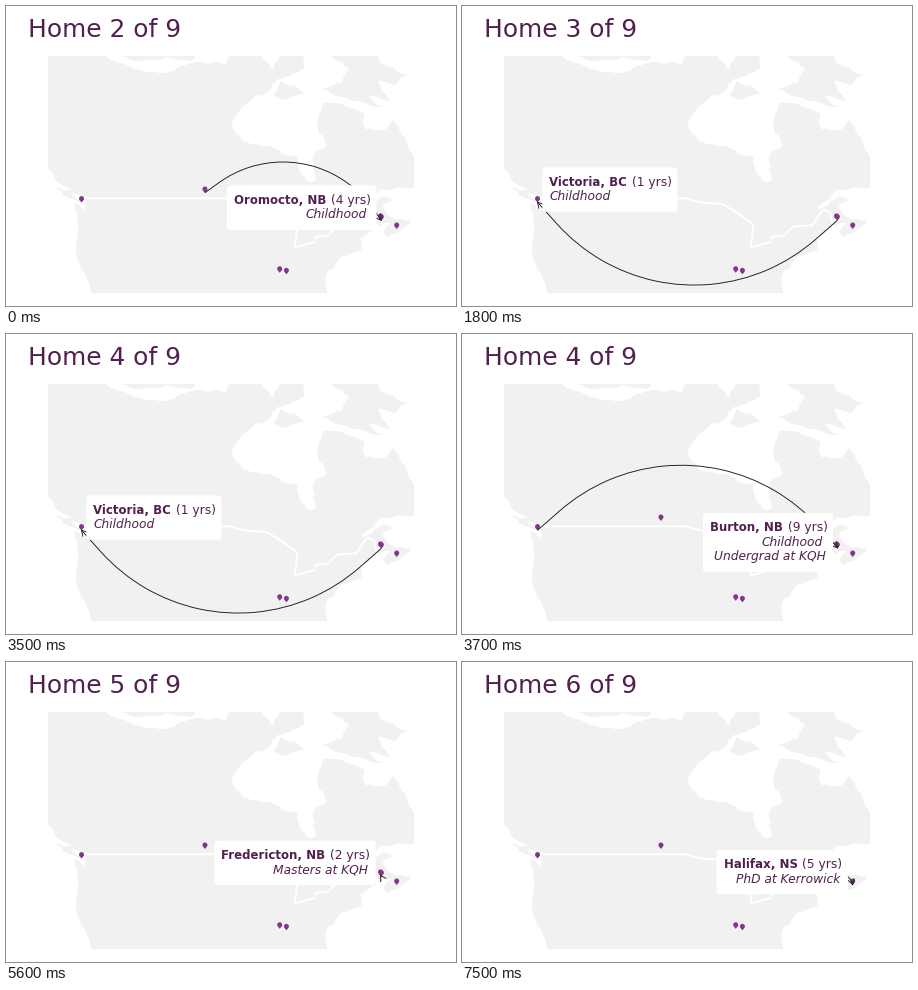
Write a matplotlib script that moves like this. It is 450 px wide and 300 px high and loops after 8 s.

```python
import math
import random

import matplotlib.pyplot as plt
from matplotlib.animation import FuncAnimation
from matplotlib.patches import (Circle, FancyBboxPatch, PathPatch, Polygon,
                                Rectangle)
from matplotlib.path import Path

W, H, DPI = 450, 300, 100
STEP, LOOP = 100, 8000
STAY, LEAD = 1900, 200          # time per move, title runs ahead by LEAD
PT = 72 / DPI
LAND, INK, PIN, LINE = "#f1f1f1", "#51204f", "#86338a", "#222222"

plt.rcParams["font.family"] = "DejaVu Sans"
random.seed(11)

# Key points as (longitude, latitude); the edges between are roughened
COAST = [
    # Arctic
    (-133, 71), (-125, 70), (-121, 69.6), (-114.5, 68), (-108, 66.9),
    (-104, 68), (-96, 68.1), (-94, 71), (-91, 70), (-87, 67.3), (-85.4, 71),
    (-81.6, 71), (-81.3, 67.5), (-86.2, 66), (-87.5, 64.5), (-90.6, 63.5),
    # Hudson Bay and Labrador
    (-94.7, 60), (-94.5, 58.7), (-92.4, 57), (-85, 55.3), (-82.3, 55),
    (-82, 52.9), (-80, 51.2), (-78.9, 51.6), (-79.6, 54.7), (-76.7, 56.5),
    (-78.5, 58.8), (-77.5, 62.5), (-73.7, 62.4), (-69.7, 61), (-69.5, 58.9),
    (-66, 58.8), (-64.5, 60.3), (-58, 53),
    # Gulf of St Lawrence and Atlantic
    (-58, 50.3), (-66.9, 50.1), (-71.2, 46.8), (-66, 49.2), (-64.4, 48.7),
    (-66.3, 48), (-64.6, 46.2), (-61.4, 45.8), (-60.3, 46.8), (-61.2, 45.2),
    (-65.6, 43.5), (-66, 44.4), (-64.6, 45.6), (-67, 45), (-70.5, 43.3),
    (-70.2, 41.8), (-74, 40.7), (-75.5, 39), (-76.8, 38.4), (-76.4, 34),
    # Pacific
    (-120.6, 34), (-122.5, 37.7), (-124.2, 40.4), (-124, 46.3),
    (-124.7, 48.2), (-122.5, 47.4), (-122.8, 49.2), (-127.5, 51.1),
    (-130, 54.2), (-133, 55),
]
ISLANDS = [
    [(-128.3, 50.6), (-125.3, 50.1), (-123.4, 48.4), (-126, 49.1)],
    [(-117, 70), (-113, 68.6), (-102, 68.9), (-101, 70)],
    [(-87, 63.7), (-85.6, 65.7), (-81, 64), (-85, 63.1)],
    [(-78, 71), (-72.6, 67.4), (-74, 65.5), (-77.8, 64.8), (-71, 62.9),
     (-66, 62), (-68.8, 63.7), (-65, 62.9), (-67.5, 66.2), (-64, 65.2),
     (-61.5, 66.7), (-67, 68.5), (-68, 71)],
]
BORDER = [
    (-123.1, 49), (-95.2, 49), (-92.5, 48.4), (-88.3, 48.2), (-84.8, 46.6),
    (-82.4, 45.2), (-82.9, 42), (-79, 42.8), (-79, 43.5), (-76.8, 43.6),
    (-74.7, 45), (-71.3, 45.1), (-69.2, 47.4), (-67.9, 47), (-67.3, 45),
]

VICTORIA, BRANDON = (-123.37, 48.43), (-99.95, 49.8)
OROMOCTO, BURTON = (-66.48, 45.85), (-66.4, 45.92)
FREDERICTON, HALIFAX = (-66.64, 45.96), (-63.57, 44.65)
SOUTH = [(-85.77, 38.4), (-84.5, 38.18)]


def project(place):
    return 725.7 + 5.27 * place[0], 535.3 - 7 * place[1]


def jag(p, q):
    """Midpoint displacement from p to q, leaving q out."""
    size = math.dist(p, q)
    if size < 3:
        return [p]
    shift = min(0.13 * size, 2.5) * random.uniform(-1, 1) / size
    mid = ((p[0] + q[0]) / 2 + shift * (p[1] - q[1]),
           (p[1] + q[1]) / 2 + shift * (q[0] - p[0]))
    return jag(p, mid) + jag(mid, q)


def rough(places):
    pts = [project(p) for p in places]
    return [c for p, q in zip(pts, pts[1:] + pts[:1]) for c in jag(p, q)]


fig = plt.figure(figsize=(W / DPI, H / DPI), dpi=DPI, facecolor="white")
ax = fig.add_axes([0, 0, 1, 1])
ax.set(xlim=(0, W), ylim=(H, 0))
ax.axis("off")


def stroke(points, color, width, z):
    return ax.plot(*zip(*points), color=color, lw=width * PT, zorder=z)[0]


def write(x, y, text, size=12.2, **style):
    return ax.text(x, y, text, fontsize=size * PT, color=INK, va="baseline",
                   zorder=7, **style)


def width(text):
    return text.get_window_extent().width


def draw_map():
    window = Rectangle((42, 49.5), 366, 237.5, transform=ax.transData)
    for shape in [COAST] + ISLANDS:
        land = Polygon(rough(shape), fc=LAND, ec="none", zorder=1)
        ax.add_patch(land)
        land.set_clip_path(window)
    stroke([project(p) for p in BORDER], "white", 2, 2)


def draw_pin(place):
    x, y = project(place)
    y -= 3.7
    ax.add_patch(Circle((x, y), 2.5, fc=PIN, ec="none", zorder=4))
    ax.add_patch(Polygon([(x - 2, y + 1.3), (x + 2, y + 1.3), (x, y + 4)],
                         fc=PIN, ec="none", zorder=4))


def arrow(start, end, bow=0.2525, parts=6, head=6):
    """Spline over points of a circular arc, with an open head."""
    (x0, y0), (x1, y1) = project(start), project(end)
    tilt = math.atan2(y1 - y0, x1 - x0)
    half = 2 * math.atan(2 * bow)
    r = math.hypot(x1 - x0, y1 - y0) / 2 / math.sin(half)
    cx = (x0 + x1) / 2 - r * math.cos(half) * math.sin(tilt)
    cy = (y0 + y1) / 2 + r * math.cos(half) * math.cos(tilt)
    pts = []
    for i in range(parts + 1):
        a = tilt - math.pi / 2 + half * (2 * i / parts - 1)
        pts.append((cx + r * math.cos(a), cy + r * math.sin(a)))

    mids = [((p[0] + q[0]) / 2, (p[1] + q[1]) / 2)
            for p, q in zip(pts, pts[1:])]
    verts = [pts[0], mids[0]]
    for p, m in zip(pts[1:-1], mids[1:]):
        verts += [p, m]
    verts.append(pts[-1])
    codes = ([Path.MOVETO, Path.LINETO]
             + [Path.CURVE3] * (2 * parts - 2) + [Path.LINETO])
    curve = PathPatch(Path(verts, codes), fc="none", ec=LINE, lw=0.95 * PT,
                      zorder=5)
    ax.add_patch(curve)

    a = tilt + half * (1 - 1 / parts)
    barbs = [(x1 - head * math.cos(a + s), y1 - head * math.sin(a + s))
             for s in (-math.pi / 6, math.pi / 6)]
    return [curve, stroke([barbs[0], (x1, y1), barbs[1]], LINE, 0.95, 5)]


def label(place, name, years, *notes, side="left"):
    """Card beside a place, as wide as its heading."""
    x, y = project(place)
    top = y - 35
    base = top + 18.4
    bold = write(0, base, name, size=11.8, weight="bold")
    plain = write(0, base, f"({years} yrs)", ha="right")
    wide = width(bold) + width(plain) + 17.2
    x0 = x + 4.8 if side == "right" else x - 4.8 - wide
    x1 = x0 + wide
    bold.set_x(x0 + 7)
    plain.set_x(x1 - 5.4)

    card = FancyBboxPatch((x0, top), wide, 15.4 + 14.6 * (len(notes) + 1),
                          fc="white", ec="none", zorder=6,
                          boxstyle="round,pad=0,rounding_size=4")
    ax.add_patch(card)
    parts = [card, bold, plain]
    for i, note in enumerate(notes, 1):
        text = note.rstrip()
        # trailing spaces push right-aligned lines inwards
        inset = 7.4 + 2.6 * (len(note) - len(text))
        at, align = (x0 + 7, "left") if side == "right" else (x1 - inset,
                                                              "right")
        parts.append(write(at, base + 14.4 * i, text, style="italic",
                           ha=align))
    return parts


draw_map()
for spot in [VICTORIA, BRANDON, OROMOCTO, FREDERICTON, HALIFAX] + SOUTH:
    draw_pin(spot)

scenes = [
    arrow(BRANDON, OROMOCTO)
    + label(OROMOCTO, "Oromocto, NB", 4, "Childhood "),
    arrow(OROMOCTO, VICTORIA)
    + label(VICTORIA, "Victoria, BC", 1, "Childhood", side="right"),
    arrow(VICTORIA, BURTON)
    + label(BURTON, "Burton, NB", 9, "Childhood ", "Undergrad at KQH"),
    arrow(BURTON, FREDERICTON)
    + label(FREDERICTON, "Fredericton, NB", 2, "Masters at KQH"),
    arrow(FREDERICTON, HALIFAX)
    + label(HALIFAX, "Halifax, NS", 5, "PhD at Kerrowick"),
]
title = write(21.9, 30.6, "", size=24.9)


def update(frame):
    t = frame * STEP + 100
    title.set_text(f"Home {2 + (t + LEAD) // STAY} of 9")
    for i, parts in enumerate(scenes):
        for part in parts:
            part.set_visible(i == t // STAY)
    return [title]


anim = FuncAnimation(fig, update, frames=LOOP // STEP, interval=STEP,
                     repeat=True, repeat_delay=0, blit=False)
plt.show()
```
